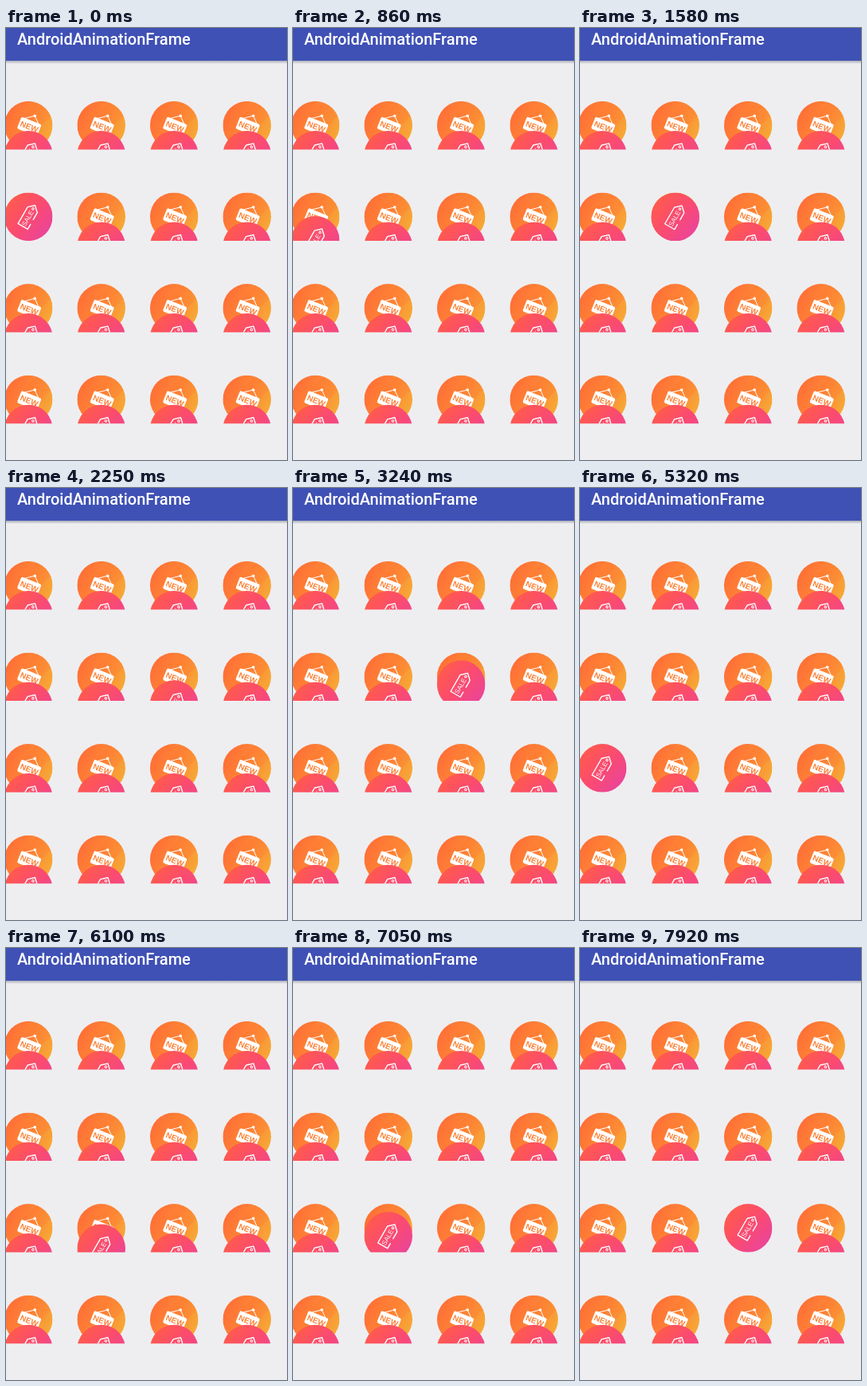
These frames come from a looping animation (353x542 px, 8 s). An HTML page with a canvas:

```html
<!DOCTYPE html>
<html lang="en">
<head>
<meta charset="utf-8">
<title>AndroidAnimationFrame</title>
<style>
html, body { margin: 0; width: 100%; height: 100%; overflow: hidden; background: #eeeef0; }
canvas { display: block; width: 353px; height: 542px; }
</style>
</head>
<body>
<canvas id="stage"></canvas>
<script>
const W = 353, H = 542, LOOP = 8000;
const R = 30.3, REST = 37, FIRST = 4;
// Each burst lowers one badge and raises the next: first step, last step, step count
const BURSTS = [
  [710, 1700, 8], [1980, 2830, 7], [3240, 4050, 7],
  [4510, 5320, 7], [5830, 6530, 6], [7050, 7920, 7]
];

const canvas = document.getElementById('stage');
const dpr = window.devicePixelRatio || 1;
canvas.width = W * dpr;
canvas.height = H * dpr;
const ctx = canvas.getContext('2d');
ctx.scale(dpr, dpr);

const clamp = x => Math.min(1, Math.max(0, x));
const easeOut = (x, power) => 1 - (1 - clamp(x)) ** power;

function gradient(x0, y0, x1, y1, ...colors) {
  const g = ctx.createLinearGradient(x0, y0, x1, y1);
  colors.forEach((c, i) => g.addColorStop(i / (colors.length - 1), c));
  return g;
}

const orange = gradient(-27, -12, 27, 15, '#ff7036', '#fd8735', '#f6a936');
const pink = gradient(-24, -20, 24, 22, '#ff5a4e', '#fa4b70', '#ea449b');
const shadow = gradient(0, 41, 0, 45, '#a9abb8', '#eeeef0');

function path(points, close) {
  ctx.beginPath();
  points.forEach(([x, y]) => ctx.lineTo(x, y));
  if (close) ctx.closePath();
}

function disc(x, y, r, fill) {
  ctx.beginPath();
  ctx.arc(x, y, r, 0, 2 * Math.PI);
  ctx.fillStyle = fill;
  ctx.fill();
}

function label(text, font, x, y, fill, align = 'center') {
  ctx.font = font;
  ctx.textAlign = align;
  ctx.fillStyle = fill;
  ctx.fillText(text, x, y);
}

function newBadge() {
  disc(0, 0, R, orange);
  ctx.save();
  ctx.clip();
  path([[-8, -10], [22, -40], [46, -30], [16, 0]], true);
  ctx.fillStyle = 'rgba(255,110,50,.22)';
  ctx.fill();
  ctx.restore();

  path([[-6, -8.5], [8, -12], [13, -1]]);
  ctx.strokeStyle = '#fff';
  ctx.lineWidth = 1;
  ctx.stroke();
  disc(8, -12, 1.8, '#fff');

  ctx.save();
  ctx.translate(1, 1.5);
  ctx.rotate(0.38);
  ctx.beginPath();
  ctx.roundRect(-13.5, -8, 27, 16, 2);
  ctx.fillStyle = '#fff';
  ctx.fill();
  label('NEW', 'bold 10px "Liberation Sans", sans-serif', 0, 3.6, '#fb8136');
  ctx.restore();
}

function saleBadge() {
  disc(0, 0, R, pink);
  ctx.save();
  ctx.rotate(-Math.PI / 3);
  path([[0, 7], [10, 7], [16.5, 0], [10, -7], [-14, -7], [-14, 7], [-7, 7]]);
  ctx.strokeStyle = '#fff';
  ctx.lineWidth = 1.4;
  ctx.lineJoin = ctx.lineCap = 'round';
  ctx.stroke();
  ctx.beginPath();
  ctx.arc(11.5, 0, 1.3, 0, 2 * Math.PI);
  ctx.lineWidth = 1;
  ctx.stroke();
  label('SALE', '8.3px "Liberation Sans", sans-serif', -2, 3, '#fff');
  ctx.restore();
}

function lifts(t) {
  const lift = Array(16).fill(0);
  lift[FIRST] = 1;
  BURSTS.forEach(([start, end, count], i) => {
    const step = Math.floor((t - start) / (end - start) * (count - 1) + 0.12);
    if (step < 0) return;
    const u = Math.min(1, step / (count - 1));
    lift[FIRST + i] = 1 - easeOut((u + 0.05) / 0.35, 2);
    lift[FIRST + i + 1] = easeOut((u - 0.32) / 0.68, 3);
  });
  return lift;
}

function draw(now) {
  ctx.fillStyle = '#eeeef0';
  ctx.fillRect(0, 0, W, H);
  ctx.fillStyle = shadow;
  ctx.fillRect(0, 41, W, 4);
  ctx.fillStyle = '#3f51b5';
  ctx.fillRect(0, 0, W, 41);
  label('AndroidAnimationFrame', '500 20px Roboto, sans-serif', 14, 21, '#fff', 'left');

  lifts(now % LOOP).forEach((lift, i) => {
    ctx.save();
    ctx.translate(28.2 + 91.5 * (i % 4), 122.2 + 114.6 * Math.floor(i / 4));
    ctx.beginPath();
    ctx.rect(-R, -R, 2 * R, 2 * R);
    ctx.clip();
    if (lift < 1) newBadge();
    ctx.translate(0, REST * (1 - lift));
    saleBadge();
    ctx.restore();
  });
}

let origin;
function tick(now) {
  origin ??= now;
  draw(now - origin);
  requestAnimationFrame(tick);
}
requestAnimationFrame(tick);
</script>
</body>
</html>
```
